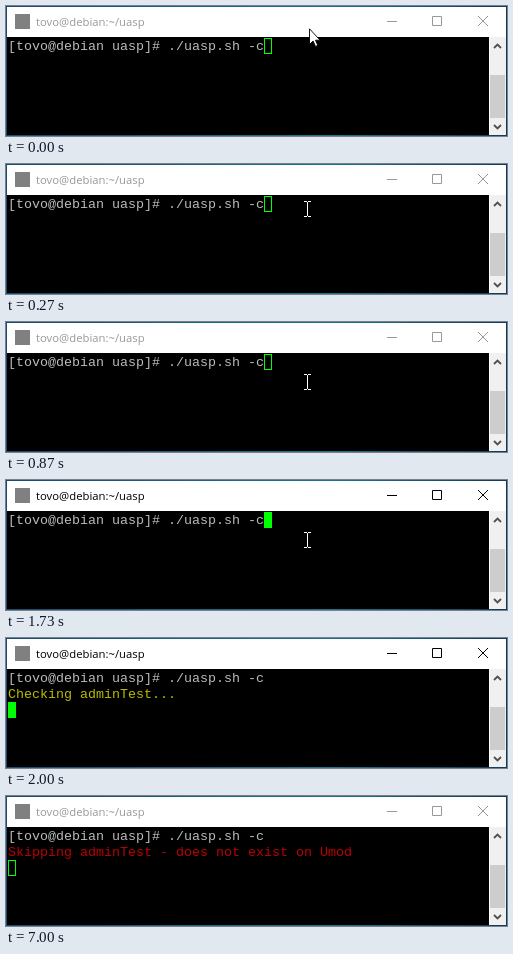
An HTML page that plays this animation: 501x130 px, repeating every 8 s.

```html
<!DOCTYPE html>
<html lang="en">
<head>
<meta charset="utf-8">
<title>Terminal</title>
<style>
  html, body { margin: 0; width: 100%; height: 100%; overflow: hidden; background: #000; }
  svg { display: block; width: 501px; height: 130px; }
  .title { font: 11.3px "Open Sans", sans-serif; }
  .term { font: 13.3333px "Liberation Mono", monospace; fill: #bbb; white-space: pre; }
  .line { fill: none; stroke-width: 1; }
</style>
</head>
<body>
<svg viewBox="0 0 501 130">
  <defs>
    <linearGradient id="edge">
      <stop offset="0" stop-color="#174b70"/>
      <stop offset=".65" stop-color="#1b7590"/>
      <stop offset="1" stop-color="#123a58"/>
    </linearGradient>
  </defs>

  <rect width="501" height="130" fill="url(#edge)"/>
  <rect x="1" y="1" width="499" height="30" fill="#fff"/>
  <rect x="9" y="8" width="15" height="15" fill="#808080"/>
  <text id="title" class="title" x="30" y="20">tovo@debian:~/uasp</text>
  <path id="buttons" class="line" d="M381 15.5h10M426.5 10.5h9v9h-9zM472 10l10 10m0-10l-10 10"/>

  <rect x="1" y="31" width="482" height="98"/>
  <rect x="483" y="31" width="17" height="98" fill="#fff"/>
  <rect x="484" y="31" width="16" height="98" fill="#f0f0f0"/>
  <rect x="484" y="69" width="15" height="43" fill="#cdcdcd"/>
  <path fill="none" stroke="#505050" stroke-width="1.8" d="M488 42l3.5-3.5 3.5 3.5M488 119l3.5 3.5 3.5-3.5"/>

  <text class="term" x="2" y="44">[tovo@debian uasp]# ./uasp.sh -c</text>
  <text id="output" class="term" x="2" y="60"></text>
  <rect id="caret" width="7" height="15" stroke="#0f0"/>

  <path id="arrow" fill="#fff" stroke="#000" stroke-width=".9"
        d="M.5.8v15.6l3.6-3.4 2.4 5.4 2.3-1-2.3-5.2h4.6z"/>
  <path id="ibeam" class="line" stroke="#fff"
        d="M-3.5-7.5h3m1 0h3M0-7v14M-3.5 7.5h3m1 0h3"/>
</svg>
<script>
const LOOP = 8000;
const FOCUS = 1730, RUN = 2000, BLUR = 2530, RESULT = 7000;

// Pointer samples: [start ms, shape, x, y]
const pointerPath = [
  [0, 'arrow', 303, 22],
  [130, 'arrow', 302, 27],
  [200, 'ibeam', 301.5, 42],
  [270, 'ibeam', 301.5, 45],
  [800, 'ibeam', 301.5, 54],
  [870, 'ibeam', 301.5, 60],
  [1870, 'ibeam', 314.5, 78],
  [1930, 'ibeam', 346.5, 111],
  [RUN, 'none', 0, 0]
];

const byId = id => document.getElementById(id);
const [title, buttons, output, caret] = ['title', 'buttons', 'output', 'caret'].map(byId);
const pointers = ['arrow', 'ibeam'].map(byId);

function draw(time) {
  const focused = time >= FOCUS && time < BLUR;
  const running = time >= RUN;
  const done = time >= RESULT;

  title.setAttribute('fill', focused ? '#000' : '#999');
  buttons.setAttribute('stroke', focused ? '#000' : '#999');

  output.textContent = done ? 'Skipping adminTest - does not exist on Umod'
    : running ? 'Checking adminTest...' : '';
  output.style.fill = done ? '#b00' : '#bb0';

  caret.setAttribute('x', running ? 2.5 : 258.5);
  caret.setAttribute('y', running ? 64.5 : 32.5);
  caret.setAttribute('fill', focused ? '#0f0' : 'none');

  const [, shape, x, y] = pointerPath.findLast(([start]) => time >= start);
  for (const pointer of pointers) {
    pointer.style.display = pointer.id === shape ? '' : 'none';
    pointer.setAttribute('transform', `translate(${x} ${y})`);
  }
}

function tick() {
  draw(performance.now() % LOOP);
  requestAnimationFrame(tick);
}
tick();
</script>
</body>
</html>
```
